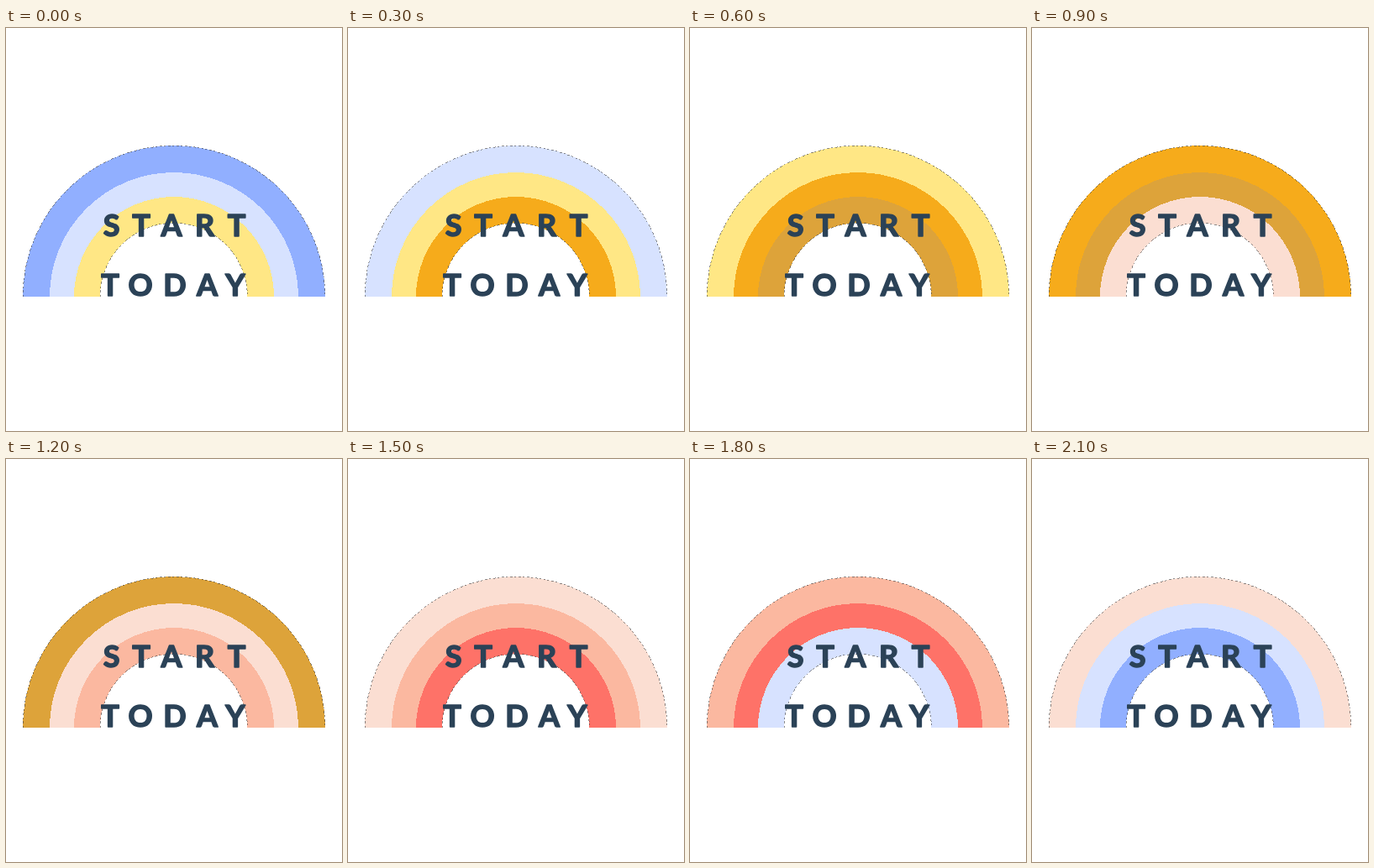
Write an HTML page that moves like this. It is 400x480 px and loops after 2.4 s.

```html
<!DOCTYPE html>
<html lang="en">
<head>
<meta charset="utf-8">
<title>Start today</title>
<style>
  :root {
    --blue: #91afff;
    --sky: #d7e2ff;
    --lemon: #ffe785;
    --orange: #f6ab1b;
    --gold: #dda33a;
    --blush: #fbded2;
    --peach: #fbb8a0;
    --coral: #fe7268;
  }
  html, body { margin: 0; width: 100%; height: 100%; overflow: hidden; background: #fff; }
  svg { display: block; width: 400px; height: 480px; }
  path { shape-rendering: crispEdges; }

  .band { animation: outer 2400ms step-end infinite; }
  .middle { animation-name: middle; }
  .inner { animation-name: inner; }
  .hole { fill: #fff; }
  .edge { fill: none; stroke: #444; stroke-width: .6; stroke-dasharray: 2 3 3 2; }
  text {
    font: 700 36px Lato, "Open Sans", sans-serif;
    text-anchor: middle;
    fill: #2b4257;
    stroke: #2b4257;
    stroke-width: 1.6;
    stroke-linejoin: round;
  }

  @keyframes outer {
    0%, 100% { fill: var(--blue); }
    12.5% { fill: var(--sky); }
    25% { fill: var(--lemon); }
    37.5% { fill: var(--orange); }
    50% { fill: var(--gold); }
    62.5% { fill: var(--blush); }
    75% { fill: var(--peach); }
    87.5% { fill: var(--blush); }
  }
  @keyframes middle {
    0%, 100% { fill: var(--sky); }
    12.5% { fill: var(--lemon); }
    25% { fill: var(--orange); }
    37.5% { fill: var(--gold); }
    50% { fill: var(--blush); }
    62.5% { fill: var(--peach); }
    75% { fill: var(--coral); }
    87.5% { fill: var(--sky); }
  }
  @keyframes inner {
    0%, 100% { fill: var(--lemon); }
    12.5% { fill: var(--orange); }
    25% { fill: var(--gold); }
    37.5% { fill: var(--blush); }
    50% { fill: var(--peach); }
    62.5% { fill: var(--coral); }
    75% { fill: var(--sky); }
    87.5% { fill: var(--blue); }
  }
</style>
</head>
<body>
<svg viewBox="0 0 400 480">
  <path class="band" d="M20 320a180 180 0 0 1 360 0z"/>
  <path class="band middle" d="M52 320a148 148 0 0 1 296 0z"/>
  <path class="band inner" d="M81 320a119 119 0 0 1 238 0z"/>
  <path class="hole" d="M112 320a87.7 87.7 0 0 1 175.4 0z"/>
  <path class="edge" d="M20.2 320a179.8 179.8 0 0 1 359.6 0M112 320a87.7 87.7 0 0 1 175.4 0"/>
  <text x="125.5 161 197 236.5 274.5" y="248.2">START</text>
  <text x="124 160 201 239.5 273" y="318.6">TODAY</text>
</svg>
</body>
</html>
```
